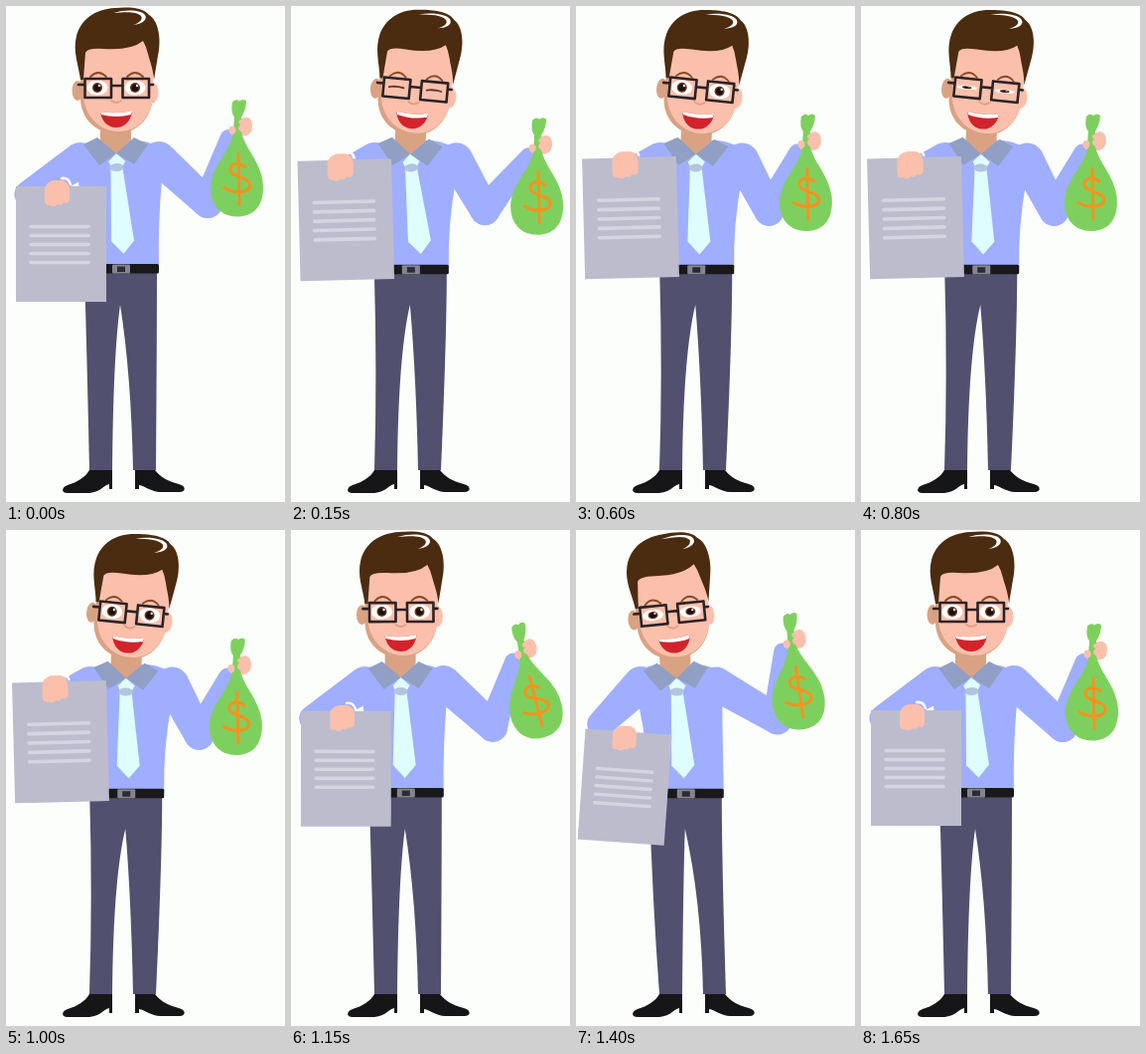
An HTML page for the animation above (1700 ms loop, 281x498 px).

```html
<!DOCTYPE html>
<html lang="en">
<head>
<meta charset="utf-8">
<title>Man with paper and money bag</title>
<style>
html, body { margin: 0; width: 100%; height: 100%; overflow: hidden; background: #fcfefb; }
svg { display: block; width: 281px; height: 498px; }
.line { fill: none; stroke-linecap: round; stroke-linejoin: round; }
.shirt { fill: #a0aeff; }
.skin { fill: #fbc0ac; }
.shade { fill: #d9a283; }
</style>
</head>
<body>
<svg viewBox="0 0 281 498">
  <path id="legs" fill="#52506f"/>
  <g fill="#161618">
    <path d="M84 466H107V485H104V480C98 481 96 488 84 489H62C55 489 56 483 62 481C72 478 80 473 84 466Z"/>
    <path d="M130 466H150C156 473 162 477 174 480C182 482 181 488 175 488H155C147 488 140 482 134 481V485H130Z"/>
  </g>
  <g class="shirt"><path id="armR"/><path id="foreR"/><path id="torso"/></g>
  <g id="belt">
    <rect x="-38" y="259" width="76" height="9.5" rx="1.5" fill="#19191b"/>
    <rect x="-9" y="259.5" width="18" height="9" rx="1" fill="#85858f"/>
    <rect x="-4" y="261.5" width="8" height="5.5" fill="#2c2c34"/>
  </g>
  <path id="armL" class="shirt"/>

  <path id="throat" class="shade" d="M-16 -28H15V-14L0 1L-16 -13Z"/>
  <g id="tie" fill="#dffcff">
    <path d="M-6 14H6L15 87L4 100L-8 87Z"/>
    <path d="M0 -1L9 7L5 14H-5L-8 7Z"/>
    <ellipse cy="13" rx="7" ry="4" fill="#b4c3de"/>
  </g>
  <path id="lapels" fill="#909fc3" d="M-33 -9L-19 -16L0 0L-17 12ZM0 0L18 -16L32 -9L18 11Z"/>

  <g id="head">
    <ellipse class="shade" cx="72" cy="85" rx="5.5" ry="10"/>
    <ellipse class="skin" cx="147.5" cy="87" rx="6" ry="10.5"/>
    <path class="shade" d="M75 40H148V90C147 114 131 128 111 128C91 128 76 114 75 94Z"/>
    <path class="skin" d="M78 30H148V90C147 112 132 126 114 126C94 126 79 110 78 90Z"/>
    <path fill="#4b2c11" d="M75 74C73 58 67 46 71 30C75 15 88 3 110 2C122 1 138 1 144 9C153 14 157 32 153 50L149 74C148 62 145 56 143 48Q141 40 138 35Q126 45 98 43Q82 42 80 47Q79 60 78 74Z"/>
    <path fill="#fff" d="M108 7C121 3 137 4 140 9C143 14 137 18 128 19C135 17 138 13 136 10C131 5 120 6 108 7Z"/>
    <path class="line" stroke="#8a4a20" stroke-width="1.8" d="M85 71Q93 63 101 71M122 71Q130 63 138 71"/>
    <g id="eyes"></g>
    <path id="lids" class="line" stroke="#60382a" stroke-width="1.8" d="M85 82Q92 80 100 82M123 82Q130 80 138 82"/>
    <path class="line" stroke="#2b2326" stroke-width="2.6" d="M79.5 73H106V92H79.5ZM117.5 73H144V92H117.5ZM106 80H117M73 79H79M144 79H148"/>
    <path class="line" stroke="#e5a084" stroke-width="2" d="M106 95Q111 99 116 95"/>
    <path fill="#d2232b" d="M95 106Q111 109 127 105C126 116 119 122 111 122C102 122 96 115 95 106Z"/>
    <path fill="#fff" d="M95 106Q111 109 127 105L126 109Q111 113 96 109Z"/>
  </g>

  <g id="paper">
    <rect width="91" height="116" fill="#bdbccd"/>
    <path class="line" stroke="#d4d5e1" stroke-width="3.5" d="M15 40.5H73M15 49.5H73M15 58.5H73M15 67.5H73M15 76.5H73"/>
    <path class="line" stroke="#fff" stroke-width="2.5" d="M46 -8Q53 -9 55 -2"/>
    <path class="skin" d="M29 3Q30 -4 38 -6H47Q54 -4 54 4V14Q52 18 48 16Q46 20 42 18Q38 22 35 19Q29 20 29 14Z"/>
  </g>

  <g id="bag">
    <path class="skin" d="M-2 -6L9 -9Q15 -8 15 0Q15 8 8 10L-6 9Z"/>
    <path fill="#7ed05e" d="M-5 -24Q-1 -28 2 -25Q6 -28 9 -25Q9 -17 4 -9V6C8 24 26 38 26 62C26 82 15 91 0 91C-16 91 -27 80 -27 62C-26 38 -6 26 -4 6L-3 -9Q-7 -14 -5 -24Z"/>
    <path class="line" stroke="#f7931e" stroke-width="3" d="M1 28L2 79M8 41C0 35 -8 38 -7 45C-5 52 13 51 13 60C12 68 -5 68 -13 62"/>
    <g class="skin">
      <ellipse cx="-5" cy="4" rx="3.5" ry="4"/><ellipse cx="6" cy="-4" rx="5" ry="3"/><ellipse cx="6" cy="2" rx="5" ry="4"/>
    </g>
  </g>
</svg>
<script>
const LOOP = 1700, STEP = 50;
const $ = id => document.getElementById(id);
const move = (id, value) => $(id).setAttribute('transform', value);
const shape = (id, value) => $(id).setAttribute('d', value);

const part = (t, a, b) => Math.min(1, Math.max(0, (t - a) / (b - a)));
const ease = (t, a, b) => { const u = part(t, a, b); return u * u * (3 - 2 * u); };
const bump = (t, a, b) => Math.sin(Math.PI * part(t, a, b));

// Tapered limb with round ends.
function limb(x1, y1, r1, x2, y2, r2) {
  const d = Math.hypot(x2 - x1, y2 - y1), nx = (y2 - y1) / d, ny = (x1 - x2) / d;
  return `M${x1 + nx * r1} ${y1 + ny * r1}L${x2 + nx * r2} ${y2 + ny * r2}` +
    `A${r2} ${r2} 0 0 1 ${x2 - nx * r2} ${y2 - ny * r2}L${x1 - nx * r1} ${y1 - ny * r1}` +
    `A${r1} ${r1} 0 0 1 ${x1 + nx * r1} ${y1 + ny * r1}Z`;
}

$('eyes').innerHTML = [92, 130].map(x => `<g transform="translate(${x} 82)">
  <ellipse rx="10.5" ry="7.5" fill="#fff"/><circle r="5" fill="#693719"/>
  <circle r="3.5" fill="#1d1010"/><circle cx="2" cy="-2" r="1.2" fill="#fff"/></g>`).join('');

function draw(t) {
  // Lean to the right, settle, lean to the left, return.
  const lean = ease(t, 0, 250) - .3 * ease(t, 400, 600) - 1.45 * ease(t, 1050, 1250) + .75 * ease(t, 1350, 1650);
  const bend = lean * lean;
  const reach = bump(t, 0, 600);
  const bagTurn = -6 * bump(t, 150, 400) - 19 * bump(t, 1050, 1450);
  const tieTurn = -2 - 2 * bump(t, 0, 400) + 3 * bump(t, 300, 1400);
  const phase = t % (LOOP / 3), lid = ease(phase, 70, 160) - ease(phase, 200, 300);

  const neck = 111 + 14 * lean, turn = 8.3 * lean;
  const hip = 116 + 7.5 * lean, l = hip - 37, r = hip + 36;
  const gripX = 233 + 11 * lean - 18 * bend + 22 * reach, gripY = 120.5 + 18 * lean + 4 * bend + 7 * reach;
  const elbowX = 203 - 6 * lean - 9 * bend, elbowY = 198 + 11 * lean;

  shape('legs', `M${l} 266H${r}Q${r} 330 151 466H128Q126 370 ${hip - 1} 300Q108 350 107 466H84Q${l + 3} 370 ${l} 266Z`);
  shape('torso', `M${l} 262Q${l - 1} 220 ${neck - 38} 176L${neck - 45} 144Q${neck - 35} 138 ${neck - 20} 135` +
    `H${neck + 22}Q${neck + 40} 137 ${neck + 52} 148L${neck + 46} 174Q${r + 1} 220 ${r + 2} 262Z`);
  shape('armR', limb(neck + 43 + 5 * lean, 153 + 3 * bend, 17, elbowX, elbowY, 15));
  shape('foreR', limb(elbowX, elbowY, 15, gripX - 9, gripY + 12, 8.5));
  shape('armL', limb(neck - 36, 155, 18, 22 + 10 * lean + 20 * bend, 189 - 14 * lean - 8 * bend, 13.5));

  const chest = `translate(${neck} ${148 + 1.5 * bend}) rotate(${turn / 2})`;
  move('throat', chest);
  move('lapels', chest);
  move('belt', `translate(${hip} ${1.5 * bend})`);
  move('tie', `translate(${neck} ${149 + bend}) rotate(${tieTurn})`);
  move('head', `translate(${neck - 111} ${3 * bend}) rotate(${turn} 111 130)`);
  move('eyes', `translate(0 ${82 * lid}) scale(1 ${1 - lid})`);
  $('lids').setAttribute('opacity', lid > .9 ? 1 : 0);
  move('paper', `translate(${10 - 2.5 * lean - 4.5 * bend} ${181 - 33 * lean - 9 * bend})
    rotate(${-4 * lean + 2.7 * bend}) scale(${1 + .06 * lean})`);
  move('bag', `translate(${gripX} ${gripY}) rotate(${bagTurn})`);
}

const start = performance.now();
function tick() {
  const t = (performance.now() - start) % LOOP;
  draw(Math.floor(t / STEP) * STEP);
  requestAnimationFrame(tick);
}
tick();
</script>
</body>
</html>
```
